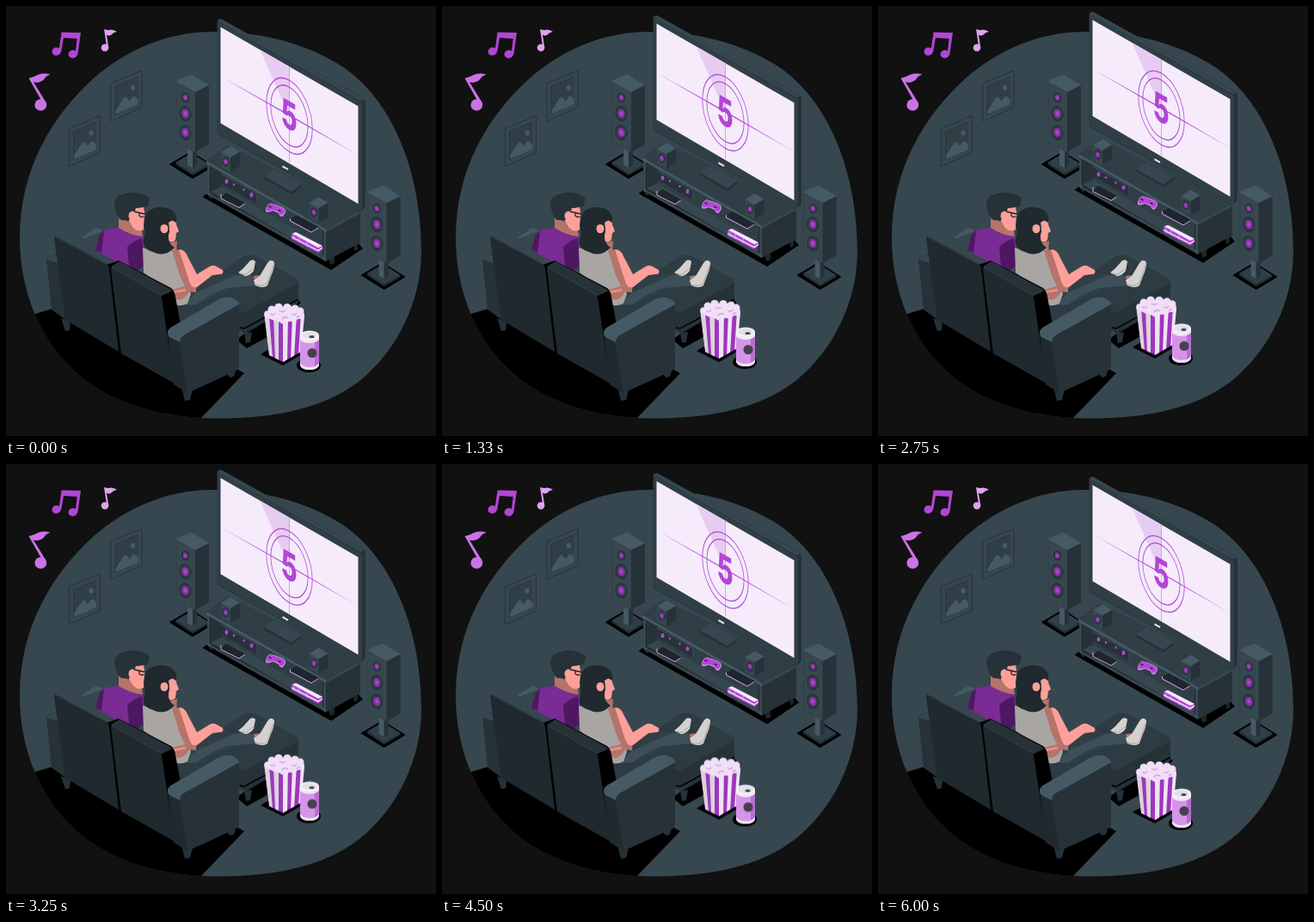
These frames come from a looping animation (500x500 px, 6040 ms). An HTML page:

```html
<!DOCTYPE html>
<html lang="en">
<head>
<meta charset="utf-8">
<title>Movie night</title>
<style>
  html, body { margin: 0; width: 100%; height: 100%; overflow: hidden; background: #111; }
  svg { display: block; width: 100vw; height: 100vh; }
  .float { animation: rise 3020ms linear infinite alternate; }
  @keyframes rise { to { transform: translateY(-9px); } }
  .black { fill: #000; }
  .ink { fill: #1c262b; }
  .dark { fill: #263238; }
  .deep { fill: #1f292e; }
  .mid { fill: #303e46; }
  .slate { fill: #37474f; }
  .light { fill: #455a64; }
  .purple { fill: #b245d6; }
  .lilac { fill: #d08be6; }
  .pale { fill: #f5ebfa; }
  .skin { fill: #ff9f99; }
  .tan { fill: #b5736a; }
  .line { fill: none; stroke: #263238; }
  .ring { fill: none; stroke: #b245d6; }
  .glow { fill: none; stroke: #d9a3ea; }
  .five { font: 800 29px Inter, Roboto, sans-serif; text-anchor: middle; }
</style>
</head>
<body>
<svg viewBox="0 0 500 500">
  <defs>
    <path id="blob" d="M16 270C16 190 53 128 103 83C142 50 188 30 240 30C297 29 354 45 395 73C454 116 483 200 483 285C483 343 455 401 411 436C368 469 310 480 240 479.5C170 478 110 458 70 415C35 377 16 325 16 270Z"/>
    <clipPath id="room"><use href="#blob"/></clipPath>
    <clipPath id="tub"><path d="M300 358L322 368L347 360L343 402L322 414L306 406Z"/></clipPath>

    <g id="woofer">
      <ellipse class="ink" rx="6.8" ry="8.8" transform="rotate(-14)"/>
      <ellipse class="light" rx="5.8" ry="7.6" transform="rotate(-14)"/>
      <ellipse class="dark" rx="5.2" ry="7" transform="rotate(-14)"/>
      <ellipse fill="#8a35a6" rx="4" ry="5.4" transform="rotate(-14)"/>
      <ellipse class="purple" rx="1.6" ry="2.2"/>
    </g>

    <g id="tower">
      <path class="black" d="M189.500 184L215 169L242 186L217 201Z"/>
      <path class="mid" d="M197 182L215.500 171L236 184L217 195Z"/>
      <path class="dark" d="M197 182L217 195V197L197 184ZM217 195L236 184V186L217 197Z"/>
      <path class="light" d="M211 165H217V188L211 185Z"/>
      <path class="dark" d="M217 165H222V185L217 188Z"/>
      <path class="slate" stroke="#303e46" stroke-width=".6" d="M198 89L220 100V170L198 158Z"/>
      <path class="dark" d="M220 100L236 92V161L220 170Z"/>
      <path class="light" d="M198 88Q198 87 200 86L214 80Q215 79.500 217 80.500L236 92L220 100Z"/>
      <use href="#woofer" transform="translate(208.500 106.500) scale(.65)"/>
      <use href="#woofer" x="208.500" y="125"/>
      <use href="#woofer" x="208.500" y="147"/>
    </g>

    <g id="cube">
      <path class="slate" d="M250 170L261 176V193L250 187Z"/>
      <path class="dark" d="M261 176L272 169.500V186L261 193Z"/>
      <path class="light" d="M250 170L261 163L272 169.500L261 176Z"/>
      <use href="#woofer" transform="translate(255.500 181) scale(.62)"/>
    </g>

    <g id="picture">
      <path class="slate" d="M73 142L110 127V171L73 187Z"/>
      <path class="line" d="M73.500 142.500L109.500 127.500V170.500L73.500 186.500Z"/>
      <path class="mid" d="M78.500 146L105 135V167.500L78.500 179Z"/>
      <path class="line" stroke-width=".8" d="M78.500 179V146L105 135"/>
      <path class="light" d="M79 174L88 160Q90 157 92 159L95 163L98 159Q100 156 102 158L105 161V167L79 178Z"/>
      <ellipse class="light" cx="99" cy="147.500" rx="2.700" ry="3.200"/>
    </g>
  </defs>

  <rect width="500" height="500" fill="#111"/>
  <use href="#blob" class="slate"/>

  <!-- music notes -->
  <g class="purple">
    <ellipse cx="58.700" cy="52.800" rx="5.300" ry="4.600" transform="rotate(-15 58.700 52.800)"/>
    <ellipse cx="77.700" cy="56" rx="5.300" ry="4.600" transform="rotate(-15 77.700 56)"/>
    <path d="M64.500 30.500L87 31L83.300 56.500H80.500L82.700 38L67 37L64.200 53H61.400Z"/>
  </g>
  <g fill="#dfa3ee">
    <ellipse cx="115" cy="48.500" rx="4.300" ry="4.200"/>
    <path d="M114 27Q119 28.500 122 27.500Q126 27.500 129 30Q125 30.500 123 33Q120.500 35.500 117 33.500L119.300 48.500H117.300Z"/>
  </g>
  <g fill="#cb72e6">
    <ellipse cx="40.300" cy="115" rx="6.900" ry="6.700"/>
    <path d="M26.500 84Q33 82.500 37 80Q44 77.500 51.500 79.500Q46 81.500 44 85.500Q39 90 32 88.500L47 113L44 115Z"/>
  </g>

  <use href="#picture"/>
  <use href="#picture" x="48.500" y="-52.500"/>
  <use href="#tower"/>

  <g class="float">
    <!-- media console -->
    <path class="black" d="M228.500 222L238 215L376 294L408 274L415 282L378 307Z"/>
    <path class="ink" d="M375 293L382 291V299L377 301ZM404 276L409 273V283L405 285ZM235 216H240V225L236 223Z"/>
    <path class="ink" d="M234 181L372 260V297L234 219Z"/>
    <path class="mid" d="M238 187L368 261V284L250 216L238 216Z"/>
    <path class="dark" d="M238 187L250 194V215L238 219Z"/>
    <path class="slate" d="M238 216L250 210L368 278V291Z"/>
    <path class="dark" d="M372 260L412 238V275L372 297Z"/>
    <path class="slate" d="M234 181H237V221L234 219ZM369 259H372V297L369 295Z"/>
    <path class="light" d="M234 216L372 293V297L234 219Z" opacity=".65"/>
    <path class="mid" d="M233 180L258 162L412 239L372 260Z"/>
    <path class="light" d="M233 180L372 259.500V263L233 183.500Z"/>
    <path class="slate" d="M372 259.500L412 238V241L372 263Z"/>

    <!-- things on the shelves -->
    <path class="dark" d="M250 195L292 218.500V230L250 206Z"/>
    <path fill="none" stroke="#455a64" stroke-width=".8" d="M250 195L292 218.500V230"/>
    <g class="purple">
      <ellipse cx="256.500" cy="204" rx="1.900" ry="2.700"/>
      <ellipse cx="265" cy="207.500" rx="1.200" ry="1.600"/>
      <ellipse cx="276.500" cy="213.500" rx="1.200" ry="1.600"/>
      <ellipse cx="285.500" cy="219.500" rx="1.900" ry="2.700"/>
    </g>
    <path class="ink" d="M249 223L256 217L278 229L271 234Z"/>
    <path class="glow" d="M250 219V224L271 234.500L277.500 230"/>
    <path class="lilac" d="M302 236Q305 228 309 229.500L314 231L321 234Q326 236 325 240L322 244.500Q319 246 317 241L310 238Q305 241 302 239Z"/>
    <path class="purple" d="M303 235.500Q305 229 309 230L321 235Q325 237 324 240L321 243Q319 244 317 239.500L310 237Q305 239 303 237.500Z"/>
    <path class="ink" d="M306 232l3 1.700l-1 1l-3-1.700ZM317 236.500l3 1.700l-1 1l-3-1.700Z"/>
    <path class="ink" d="M330 248L338 243L364 257L356 263Z"/>
    <path class="glow" d="M330.500 247V250L355 263L363 258"/>
    <path class="purple" d="M332 265L337 263L368 279V283L363 287L332 271Z"/>
    <path class="pale" d="M333 264.500L337 263L368 279L363 281Z"/>
    <path d="M332 268.500L363 284.500L368 281" fill="none" stroke="#f5ebfa" stroke-width="1.300"/>
    <path d="M335 266v6M341 269v6M350 274v6" stroke="#e3b5f0" stroke-width=".8"/>

    <!-- screen foot and small speakers -->
    <path class="slate" d="M300 198L312 190L344 207L332 216Z"/>
    <path class="dark" d="M300 198L332 216L344 207V210L332 219L300 201Z"/>
    <use href="#cube"/>
    <use href="#cube" x="102.500" y="59"/>

    <!-- television -->
    <path class="dark" d="M245.500 18Q246 15 250 15L415 107Q418 109 418 112V232Q418 235 415 237L411 240L248 150Q245.500 148.500 245.500 146Z"/>
    <path class="slate" d="M246 19Q246 15 250 15L416 108L413 111L249 19Q247 18 247 22Z"/>
    <path class="mid" d="M246 21Q246 17 249 19L411 111Q414 113 414 116V235Q414 240 410 239L248 149Q246 148 246 145Z"/>
    <path class="pale" d="M249.500 24.500L409.500 116.500V230L249.500 136.300Z"/>
    <path fill="#e7ccf2" d="M295.500 51L329.500 70.500V128Z"/>
    <path d="M329.500 70.500V182" stroke="#c884df" stroke-width=".7"/>
    <path class="purple" d="M250 82L329.500 126.300L409 173L329.500 127.900Z"/>
    <g transform="matrix(1 .57 0 1.56 329.500 128)">
      <circle class="ring" r="26.700" stroke-width=".8"/>
      <circle class="ring" r="21.600" stroke-width=".8"/>
      <text class="purple five" y="10">5</text>
    </g>
    <path d="M321.500 186.300L328 190" stroke="#e8e8e8" stroke-width="2"/>
  </g>

  <use href="#tower" x="222.700" y="129"/>

  <!-- floor shadow and footrest -->
  <g clip-path="url(#room)">
    <path class="black" d="M20 362L54 352L130 360L270 423L277 427L224 482L20 482Z"/>
  </g>
  <path class="black" d="M268 388L280 398L302 386L343 345L334 338Z"/>
  <path class="dark" d="M277 380L286 379L284 391L279 392ZM333 344L340 341L338 349L334 350Z"/>
  <path class="dark" d="M272 352L340 321V343Q340 345 338 346L278 381L268 375Z"/>
  <path d="M272 374L277 375L340 341" fill="none" stroke="#000" stroke-width="1.500"/>
  <path fill="#2d3b42" d="M195 345L275 292Q283 287 291 291L338 317Q342 320 338 323L280 355Q275 358 269 353L250 341L205 372Z"/>

  <!-- sofa behind the couple -->
  <path class="light" d="M88 269L103 259Q107 257 112 261L118 290Z"/>
  <path class="slate" d="M86 272L112 262L112 292Z"/>
  <path fill="#2d3b42" d="M190 350L235 330L266 341L200 374Z"/>

  <!-- man -->
  <path fill="#7a2b94" d="M104 284L110 265Q112 261 118 260L133 257L158 266Q161 275 161 302L150 309Z"/>
  <path fill="#4e1762" d="M104 284L109 266L114 261L111 287ZM141 280Q150 272 158 270L161 302L151 309L143 302Z"/>
  <path class="tan" d="M131 247L157 255L159 268Q145 267 131 258Z"/>
  <path class="skin" d="M144 236L160 234L162 246L164 250L161 252L160 260Q154 264 148 258L143 250Z"/>
  <path class="dark" d="M126 231Q126 221 136 219Q147 214 160 219L167 223L165 233L151 235L149 241L143 249L134 249Q127 242 126 231Z"/>
  <ellipse class="skin" cx="147" cy="244" rx="4.500" ry="5.500"/>
  <path d="M149 239L162 242M155 240v4q4 3 6 0" fill="none" stroke="#1c262b" stroke-width="1.300"/>

  <!-- woman -->
  <path class="mid" d="M205 349L213 326Q228 318 252 311L291 313L292 324L262 330L220 347Z"/>
  <path fill="#3d4f58" d="M210 348Q214 335 229 330L264 314Q277 311 291 315L290 325L257 328Q238 334 222 347Z"/>
  <path fill="#d5d1ce" d="M270 310L276 305L284 296Q288 294 290 297L288 308Q283 314 278 314Z"/>
  <path d="M272 311L279 312L288 305" fill="none" stroke="#a9a5a3"/>
  <path class="tan" d="M288 314L296 313L296 324L290 325Z"/>
  <path fill="#d5d1ce" d="M288 319L295 314L304 299Q308 293 312 298Q312 306 308 314L304 325Q299 329 290 325Z"/>
  <path d="M290 324Q299 327 304 322L311 302" fill="none" stroke="#a9a5a3"/>
  <path class="tan" d="M189 276L199 273L198 287L189 287Z"/>
  <path fill="#a9a5a3" d="M159 281L180 287L194 282Q204 284 207 301L215 335L211 346Q203 350 195 347L190 332L160 310Z"/>
  <path class="tan" d="M193 284Q202 280 210 293L222 314L221 333L211 332L202 313ZM189 331L208 326L213 332Q209 340 201 342L190 337Z"/>
  <path class="skin" d="M201 283Q208 283 211 291L222 312L235 304Q240 300 245 303L252 307Q254 312 248 312L240 313L222 327Q216 329 213 320Z"/>
  <path d="M193 333L209 330" stroke="#e18f88" stroke-width="3"/>
  <path class="skin" d="M184 245L197 246L198 254L201 262L198 264L197 272Q191 278 186 270Z"/>
  <path fill="#20292e" d="M161 246Q164 235 178 234Q194 233 198 245Q199 250 197 252Q194 247 189 252Q191 262 189 266Q188 276 196 281Q184 293 171 286Q158 282 160 272Q163 264 160 255Z"/>
  <ellipse class="skin" cx="184" cy="259" rx="4.500" ry="5.300"/>

  <!-- sofa back and arms -->
  <path class="dark" d="M64 363L75 367L74 377L69 378ZM204 443L217 446L214 458L208 459ZM256 426L268 421L265 431L260 432Z"/>
  <path class="dark" d="M47 295Q48 291 54 289L61 290L71 366L53 353Z"/>
  <path class="slate" d="M47 295Q48 291 54 289L60 291L61 299Z"/>
  <path class="black" d="M117 301L131 296L192 328Q196 331 197 338L203 371L188 378L196 440L131 404Z"/>
  <path class="deep" d="M56 270Q56 267 60 269L116 299Q119 301 120 305L131 402L69 365Z"/>
  <path class="deep" d="M122 306Q122 302 126 304L177 333Q180 335 181 339L196 439L134 404Z"/>
  <path class="dark" d="M122 303L132 297L191 329Q194 331 192 332L181 337Z"/>
  <path d="M58 269L117 300M123 304L180 336" stroke="#37474f" stroke-width=".8"/>
  <path class="deep" d="M188 380L207 387L211 450L195 440Z"/>
  <path class="dark" d="M201 389Q203 384 208 381L264 347Q271 344 271 350V419Q271 422 268 424L211 450Z"/>
  <path class="light" d="M188 380Q188 376 193 373L246 342Q256 336 264 340Q271 343 271 347L208 382Q202 385 202 391L192 386Q188 384 188 380Z"/>

  <!-- snacks -->
  <g class="float">
    <path class="black" d="M296 405L306 399L343 398L346 404L322 418Z"/>
    <ellipse class="black" cx="352" cy="418" rx="14" ry="8"/>
    <g clip-path="url(#tub)">
      <rect x="298" y="355" width="52" height="62" fill="#9d36bd"/>
      <path fill="#d9d4dc" d="M300 356L306 360L310 409L306 408ZM311 360L317 362L317 414L313 411Z"/>
      <path fill="#eee4f2" d="M322 362L328 360L327 414L322 416ZM333 360L338 358L335 409L331 411ZM343 358L349 357L343 404L340 406Z"/>
    </g>
    <g fill="#f1def7">
      <path d="M301 358L312 350L336 350L347 358L344 363L322 369L302 362Z"/>
      <circle cx="304" cy="358" r="3.800"/><circle cx="309" cy="353" r="4.500"/>
      <circle cx="317" cy="350.500" r="4.800"/><circle cx="327" cy="351" r="5"/>
      <circle cx="336" cy="352" r="4.600"/><circle cx="342" cy="355" r="4.500"/>
      <circle cx="343" cy="360" r="4"/><circle cx="334" cy="363" r="4.500"/>
      <circle cx="323" cy="365" r="4.800"/><circle cx="312" cy="361" r="4.500"/>
    </g>
    <path d="M307 358q4 3 6-1M318 354q3 3 7 0M321 364q3-4 7-1M332 358q4 3 6-1M338 363q1-3 4-2" fill="none" stroke="#d2a3e2" stroke-width="1.300"/>
    <path fill="#d594e9" d="M342 383H364V417Q363 423 353 423Q343 423 342 417Z"/>
    <path fill="#b96cd2" d="M359 384H364V417Q363 420 359 422Z"/>
    <path fill="#f0e9f2" d="M342 383H364V388Q360 392 353 392Q345 392 342 388ZM342 415Q345 420 353 420Q361 420 364 415V418Q362 423 353 423Q344 423 342 418Z"/>
    <ellipse cx="353" cy="383" rx="11" ry="5.500" fill="#f7f3f8"/>
    <ellipse cx="353" cy="383" rx="8.800" ry="4" fill="#e4dfe6"/>
    <ellipse cx="355.500" cy="384.500" rx="3" ry="1.500" fill="#37474f"/>
    <circle cx="356" cy="403.500" r="5.500" fill="#46404f"/>
  </g>
</svg>
</body>
</html>
```
